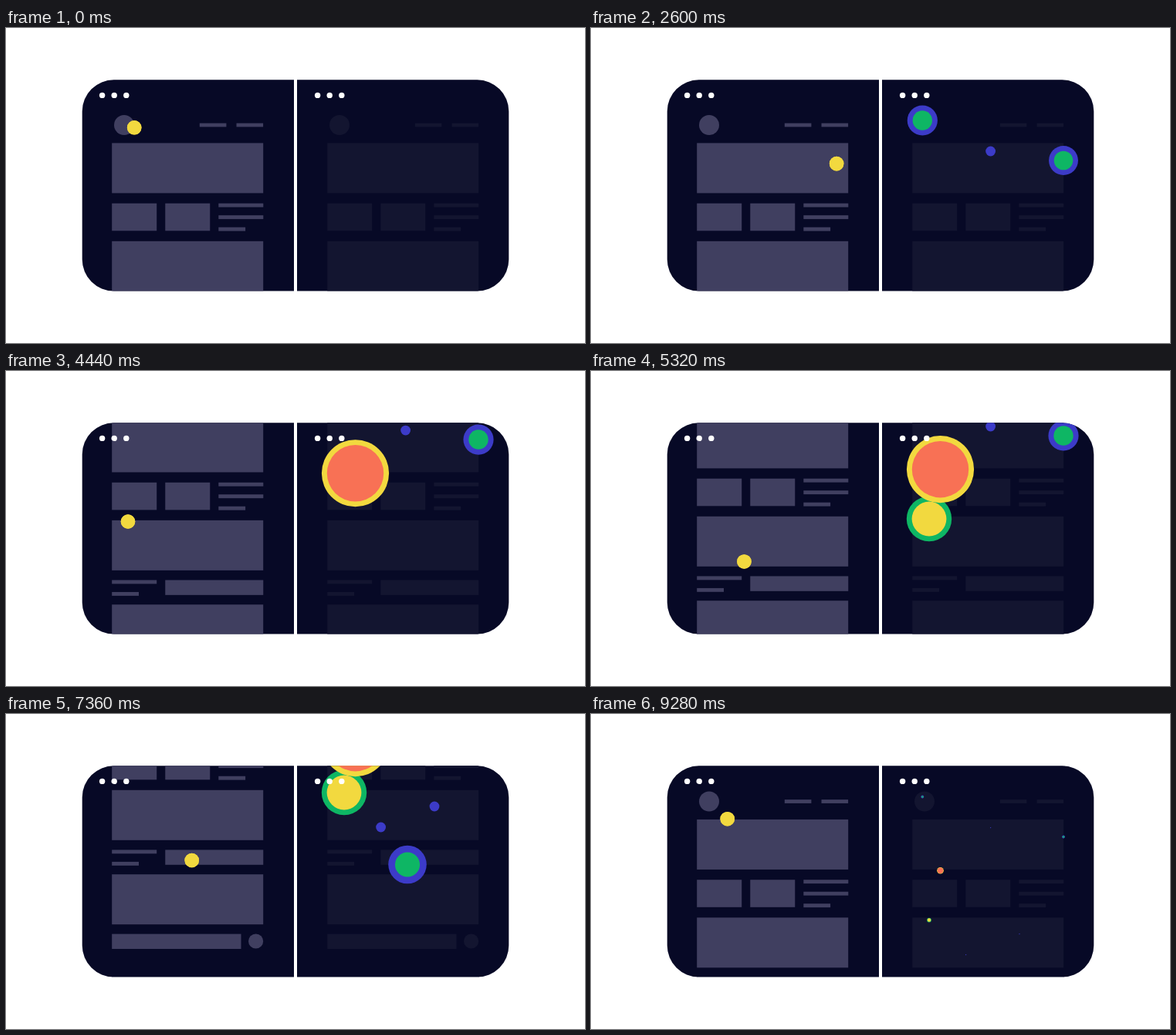
These frames come from a looping animation (750x409 px, 9320 ms). An HTML page:

```html
<!DOCTYPE html>
<html lang="en">
<head>
<meta charset="utf-8">
<title>Click heatmap</title>
<style>
  html, body { margin: 0; width: 100%; height: 100%; overflow: hidden; background: #fff; }
  svg { display: block; width: 100%; height: 100%; }
</style>
</head>
<body>
<svg viewBox="0 0 750 409">
  <defs>
    <path id="panelL" d="M373 67.3V341.5H139.7A41 41 0 0 1 98.7 300.5V108.3A41 41 0 0 1 139.7 67.3Z"/>
    <use id="panelR" href="#panelL" transform="translate(750 0) scale(-1 1)"/>
    <clipPath id="clipL"><use href="#panelL"/></clipPath>
    <clipPath id="clipR"><use href="#panelL" transform="translate(750 0) scale(-1 1)"/></clipPath>
    <g id="page"></g>
    <g id="buttons" fill="#fff"></g>
  </defs>

  <g fill="#070926"><use href="#panelL"/><use href="#panelR"/></g>
  <g clip-path="url(#clipL)"><g class="scroll" fill="#403f60"><use href="#page"/></g></g>
  <g clip-path="url(#clipR)">
    <g class="scroll">
      <use href="#page" x="279" fill="#131530"/>
      <g id="spots"></g>
    </g>
  </g>
  <use href="#buttons"/>
  <use href="#buttons" x="279"/>
  <g id="cursor" fill="#f2d93f">
    <circle id="dot"/>
    <circle id="ring" fill="none" stroke="#f2d93f" stroke-width="1.8"/>
  </g>
</svg>
<script>
const LOOP = 9320, STEP = 40, SHIFT = 279;
const START = 520, RESET = 9100, RESET_END = 9317;
const DWELL = 280, SWAY = 20;
const BLUE = '#3c3bc8', GREEN = '#0eb664', YELLOW = '#f2d93f', CORAL = '#f87155';

const $ = id => document.getElementById(id);
const clamp = v => Math.min(1, Math.max(0, v));
const mix = (a, b, e) => a + (b - a) * e;
const sine = (t, a, b) => (1 - Math.cos(Math.PI * clamp((t - a) / (b - a)))) / 2;
const cubic = u => u < 0.5 ? 4 * u ** 3 : 1 - 4 * (1 - u) ** 3;

function add(parent, name, attrs) {
  const el = document.createElementNS('http://www.w3.org/2000/svg', name);
  for (const k in attrs) el.setAttribute(k, attrs[k]);
  parent.append(el);
  return el;
}
const circle = (parent, cx, cy, r, fill) => add(parent, 'circle', fill ? { cx, cy, r, fill } : { cx, cy, r });

// Wireframe on a three-column grid
const LEFT = 137.2, COL = 58, FULL = 196;
const col = i => LEFT + i * 69.05;
const block = (x, y, width, height) => add($('page'), 'rect', { x, y, width, height });
const banner = y => block(LEFT, y, FULL, 65);
function lines(i, y, count) {
  for (let n = 0; n < count; n++)
    block(col(i), y + n * 15.5, n < count - 1 ? COL : COL * 0.6, 4.9);
}
circle($('page'), 153, 126, 13);
for (const x of [250.8, 298.5]) block(x, 123.6, 34.6, 4.8);
for (const y of [149.4, 276.8, 386.2]) banner(y);
for (const i of [0, 1]) block(col(i), 227.7, COL, 35.6);
lines(2, 227.7, 3);
lines(0, 354.4, 2);
block(col(1), 354.4, FULL - 69, 19.4);
block(LEFT, 463.6, 167.3, 19.4);
circle($('page'), 323.6, 473, 9.6);
for (let i = 0; i < 3; i++) circle($('buttons'), 124.6 + i * 15.6, 87.4, 3.7);

// Two scroll moves: start, end, distance
const scrolls = [[4100, 4502, 88], [6680, 7100, 90]];
const pageTop = t => scrolls.reduce((sum, [a, b, d]) => sum + d * sine(t, a, b), 0);
const settledTop = t => scrolls.reduce((sum, [a, , d]) => sum + (t > a ? d : 0), 0);

// Cursor stops; each one leaves a heat spot, nudged by dx, dy
const kinds = {
  faint: { r: 6.4, inner: 0, rim: BLUE, fill: BLUE },
  cool: { r: 19.6, inner: 12.7, rim: BLUE, fill: GREEN },
  warm: { r: 29.2, inner: 22.4, rim: GREEN, fill: YELLOW },
  hot: { r: 43.6, inner: 36.7, rim: YELLOW, fill: CORAL }
};
const stop = (at, x, y, kind, dx = 0, dy = 0, size = 1) => ({ at, x, y, kind, dx, dy, size });
const stops = [
  stop(710, 150.3, 120, 'cool'),
  stop(1490, 238.6, 160, 'faint'),
  stop(2020, 333, 172, 'cool'),
  stop(3350, 173.5, 215.7, 'hot'),
  stop(4440, 158, 195.5, 'warm', 1, -3.5),
  stop(5640, 206.6, 237, 'faint'),
  stop(6420, 274, 208, 'faint', 2, 2),
  stop(7050, 240.7, 190, 'cool', 0.3, 5.5),
  stop(8060, 316.2, 227.6, 'hot', -7.8, 12.8, 0.9)
];
const home = { at: START - DWELL, x: 166.2, y: 129.3 };

// Older spots lie on top
for (const s of [...stops].reverse()) {
  const k = kinds[s.kind];
  s.spot = add($('spots'), 'g', {});
  circle(s.spot, 0, 0, k.r * s.size, k.rim);
  circle(s.spot, 0, 0, k.inner * s.size, k.fill);
}

// Grow past full size, then ring down to rest
function pop(dt) {
  const rise = 320, over = 0.38, d = dt - rise;
  if (d < 0) return (1 + over) * sine(dt, 0, rise);
  return 1 + over * Math.exp(-d / 85) * Math.cos(Math.PI * d / 200);
}

// Wait at each stop, then ease to the next; moves to the right sway
function cursorAt(t) {
  const i = stops.findIndex(s => s.at > t);
  const last = stops[stops.length - 1];
  if (i < 0) {
    const e = sine(t, RESET, RESET_END);
    return [mix(last.x, home.x, e), mix(last.y, home.y, e)];
  }
  const a = stops[i - 1] || home, b = stops[i], from = a.at + DWELL;
  const e = cubic(clamp((t - from) / (b.at - from)));
  const sway = b.x > a.x ? SWAY * Math.sign(a.y - b.y) * Math.sin(2 * Math.PI * e) : 0;
  return [mix(a.x, b.x, e), mix(a.y, b.y, e) + sway];
}

function draw(t) {
  const top = pageTop(t) * (1 - sine(t, RESET, RESET_END));
  for (const g of document.querySelectorAll('.scroll'))
    g.setAttribute('transform', `translate(0 ${-top})`);

  const shrink = 1 - sine(t, RESET + 24, LOOP);
  let press = 0;
  for (const s of stops) {
    const dt = t - s.at;
    const k = dt > 50 ? pop(dt - 50) * shrink : 0;
    const x = s.x + SHIFT + s.dx, y = s.y + settledTop(s.at) + s.dy;
    s.spot.setAttribute('transform', `translate(${x} ${y}) scale(${k})`);
    press = Math.max(press, sine(dt, 0, 50) * (1 - sine(dt, 200, 260)));
  }

  const [x, y] = cursorAt(t);
  $('cursor').setAttribute('transform', `translate(${x} ${y})`);
  $('dot').setAttribute('r', 9.3 - 3.8 * press);
  $('ring').setAttribute('r', 8.4 + 0.9 * press);
}

const t0 = performance.now();
function tick() {
  const t = (performance.now() - t0) % LOOP;
  draw(Math.floor(t / STEP) * STEP);
  requestAnimationFrame(tick);
}
tick();
</script>
</body>
</html>
```
